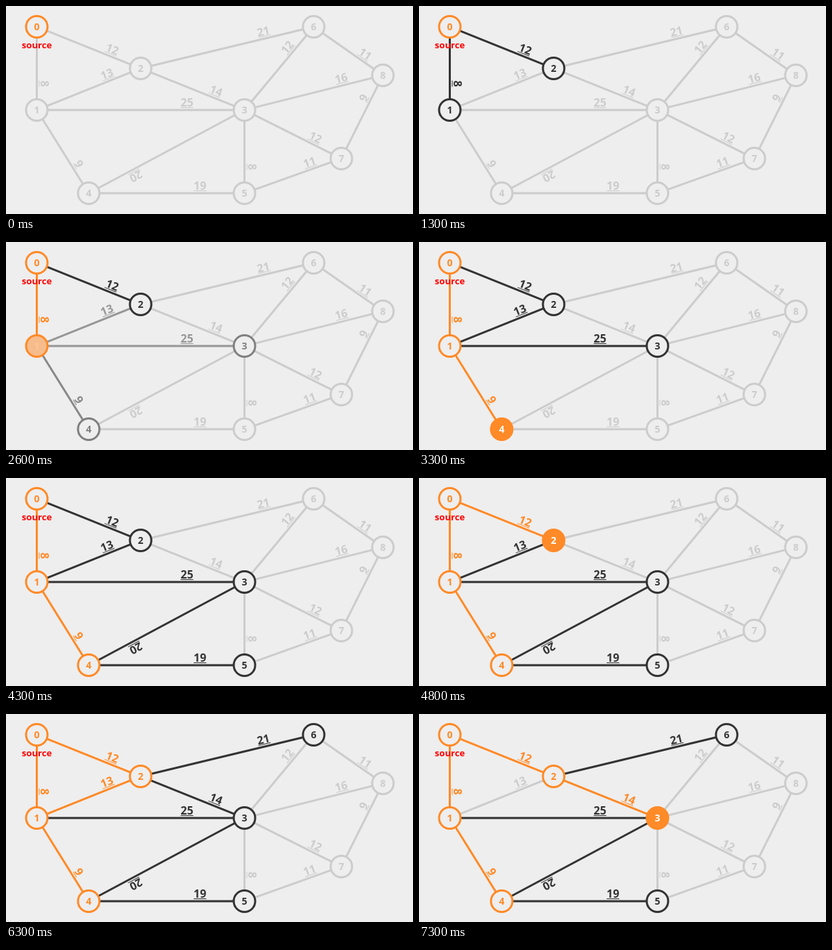
Animation, 588 px wide and 300 px high, one loop 8000 ms. Source, as an HTML page with a canvas:

```html
<!DOCTYPE html>
<html lang="en">
<head>
<meta charset="utf-8">
<title>Spanning tree</title>
<style>
html, body { margin: 0; width: 100%; height: 100%; overflow: hidden; background: #eee; }
canvas { display: block; }
</style>
</head>
<body>
<canvas id="stage" width="588" height="300"></canvas>
<script>
const ctx = document.getElementById("stage").getContext("2d");
const LOOP = 8000, TICK = 100, FADE = 350, EDGE_LAG = 20;
const FONT = '"Open Sans", "Noto Sans", sans-serif';
const RADIUS = 15.5, TRIM = 16;

const BG = [238, 238, 238], GREY = [204, 204, 204], DARK = [51, 51, 51];
const ORANGE = [255, 138, 39], WHITE = [255, 255, 255];

// Each look is [line, fill, text]; edges use the line colour only.
const LOOKS = {
  idle: [GREY, BG, GREY],
  queued: [DARK, BG, DARK],
  current: [ORANGE, ORANGE, WHITE],
  done: [ORANGE, BG, ORANGE]
};

const nodes = [[44, 30], [44, 150], [194, 90], [344, 150], [119, 270],
  [344, 270], [444, 30], [484, 220], [544, 100]].map(([x, y]) => [x + 0.5, y]);

// from, to, weight
const edges = [
  [0, 1, 8], [0, 2, 12], [1, 2, 13], [1, 3, 25], [1, 4, 9], [2, 3, 14],
  [2, 6, 21], [3, 4, 20], [3, 5, 8], [3, 6, 12], [3, 7, 12], [3, 8, 16],
  [4, 5, 19], [5, 7, 11], [6, 8, 11], [7, 8, 9]
];

// start time, look, items: "1" is a node, "0-1" an edge
const changes = [
  [-1000, "done", "0"],
  [945, "queued", "0-1 0-2 1 2"],
  [1440, "current", "0-1 1"],
  [2425, "done", "1"],
  [2425, "queued", "1-2 1-3 3 4"],
  [2412, "queued", "1-4"],
  [2940, "current", "1-4 4"],
  [3940, "done", "4"],
  [3940, "queued", "3-4 4-5 5"],
  [4440, "current", "0-2 2"],
  [5450, "done", "2"],
  [5450, "queued", "2-3 2-6 6"],
  [5985, "current", "1-2"],
  [6485, "idle", "1-2"],
  [6985, "current", "2-3 3"]
].map(([start, look, items]) => ({ start, look: LOOKS[look], items: items.split(" ") }));

const mix = (a, b, k) => a.map((v, i) => v + (b[i] - v) * k);
const css = c => `rgb(${c.map(Math.round).join(",")})`;

function ease(u) {
  u = Math.min(1, Math.max(0, u));
  return u < 0.5 ? 4 * u ** 3 : 1 - 4 * (1 - u) ** 3;
}

function lookAt(id, t) {
  const lag = id.includes("-") ? EDGE_LAG : 0;
  let look = LOOKS.idle;
  for (const c of changes) {
    if (!c.items.includes(id)) continue;
    const k = ease((t - c.start - lag) / FADE);
    look = look.map((color, i) => mix(color, c.look[i], k));
  }
  return look.map(css);
}

function write(text, x, y, size, color) {
  ctx.font = `bold ${size}px ${FONT}`;
  ctx.fillStyle = color;
  ctx.fillText(text, x, y);
}

function drawEdge([a, b, weight], t) {
  const [x, y] = nodes[a], [x2, y2] = nodes[b];
  const color = lookAt(`${a}-${b}`, t)[0];
  const length = Math.hypot(x2 - x, y2 - y) - 2 * TRIM;
  ctx.save();
  ctx.translate(x, y);
  ctx.rotate(Math.atan2(y2 - y, x2 - x));
  ctx.translate(TRIM, 0);
  ctx.fillStyle = color;
  ctx.fillRect(0, -1.5, length, 3);
  ctx.translate(length * 0.75, -5);
  write(weight, 0, 0, 16, color);
  const width = ctx.measureText(weight).width;
  ctx.fillRect(-width / 2, 1, width, 1);
  ctx.restore();
}

function drawNode([x, y], i, t) {
  const [line, fill, text] = lookAt(String(i), t);
  ctx.beginPath();
  ctx.arc(x, y, RADIUS, 0, Math.PI * 2);
  ctx.fillStyle = fill;
  ctx.fill();
  ctx.strokeStyle = line;
  ctx.lineWidth = 3;
  ctx.stroke();
  write(i, x, y + 5, 14, text);
}

function draw(t) {
  ctx.fillStyle = css(BG);
  ctx.fillRect(0, 0, 588, 300);
  ctx.textAlign = "center";
  edges.forEach(e => drawEdge(e, t));
  nodes.forEach((n, i) => drawNode(n, i, t));
  write("source", 44.5, 61, 13.2, "#f00");
}

const begin = performance.now();
function frame() {
  const t = (performance.now() - begin) % LOOP;
  draw(Math.floor(t / TICK) * TICK);
  requestAnimationFrame(frame);
}
frame();
</script>
</body>
</html>
```
